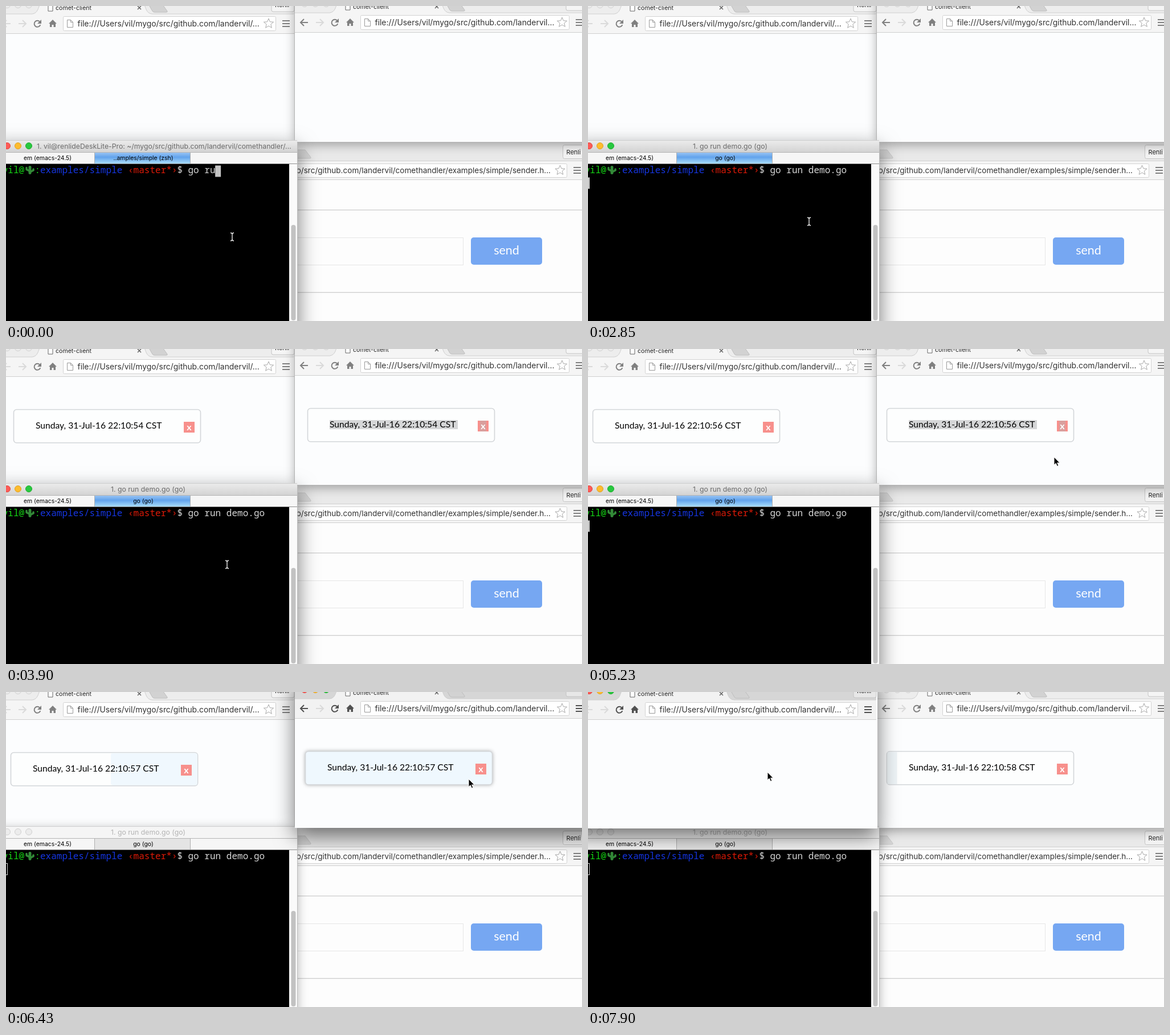
Animation, 1011 px wide and 554 px high, one loop 8 s. Source, as an HTML page:

```html
<!DOCTYPE html>
<html lang="en">
<head>
<meta charset="utf-8">
<title>comet-client</title>
<style>
html, body { margin: 0; width: 100%; height: 100%; overflow: hidden; background: #fdfdfd; }
svg { display: block; }
text { font-family: Inter, "Liberation Sans", sans-serif; white-space: pre; }
.mono { font: 500 16.05px "Noto Sans Mono", "DejaVu Sans Mono", monospace; }
.geo { font-family: Lato, "Open Sans", sans-serif; }
.mid { text-anchor: middle; }
.url { font-size: 13.88px; fill: #333; }
#sender .url { font-size: 13.55px; }
.tab { font-size: 10.6px; fill: #222; }
.frame { fill: #fcfdfe; filter: drop-shadow(0 5px 9px rgba(0,0,0,.32)); }
.on > .frame { filter: drop-shadow(0 14px 18px rgba(0,0,0,.55)); }
.strip { fill: #ededed; }
.on > .strip { fill: #d6d6d6; }
.bar { fill: #f5f5f5; }
.on > .bar { fill: #f2f2f2; }
.edge { stroke: #cfcfcf; fill: none; }
.icon { stroke: #808080; stroke-width: 2; fill: none; }
.on > .icon { stroke: #505050; }
.faint { stroke: #dadada; stroke-width: 2; fill: none; }
.icon .solid { fill: #808080; stroke: none; }
.on > .icon .solid { fill: #505050; }
.light { fill: #ececec; stroke: #d0d0d0; }
.on > .r { fill: #fc5b57; stroke: #e2463f; }
.on > .y { fill: #fdbc2e; stroke: #e0a023; }
.on > .g { fill: #28c840; stroke: #1dad2b; }
#title { font-size: 12.25px; fill: #b4b4b4; }
.on > #title { fill: #6b6b6b; }
#term .off { fill: #f5f5f5; }
#term .picked { fill: #e4e4e4; }
#term.on .off { fill: url(#chrome); }
#term.on .picked { fill: url(#aqua); }
.box { fill: #fdfefe; stroke: #d3d6d9; stroke-width: 1.6; }
.hover .box { fill: #eff8fe; filter: drop-shadow(0 0 3px rgba(0,0,0,.3)); }
.caption { font-size: 15.65px; }
</style>
</head>
<body>
<svg id="stage" width="1011" height="554" viewBox="0 0 1011 554"></svg>
<script>
const LOOP = 8000;
const svg = document.getElementById('stage');
const $ = id => document.getElementById(id);

const rect = (x, y, w, h, attrs = '') => `<rect x="${x}" y="${y}" width="${w}" height="${h}" ${attrs}/>`;
const text = (x, y, str, cls = '', attrs = '') => `<text x="${x}" y="${y}" class="${cls}" ${attrs}>${str}</text>`;
const line = (x1, y1, x2, y2, color) => `<path d="M${x1} ${y1}L${x2} ${y2}" stroke="${color}"/>`;

function star(cx, cy) {
  const pts = Array.from({ length: 10 }, (_, i) => {
    const a = i * Math.PI / 5 - Math.PI / 2, r = i % 2 ? 4 : 9;
    return (cx + r * Math.cos(a)).toFixed(1) + ',' + (cy + r * Math.sin(a)).toFixed(1);
  });
  return `<polygon points="${pts.join(' ')}" fill="#fff" stroke="#a8a8a8"/>`;
}

const menu = (x, y) => `<path class="icon" d="M${x} ${y - 5}h13m-13 5h13m-13 5h13"/>`;

const lights = y => ['r', 'y', 'g'].map((c, i) =>
  `<circle class="light ${c}" cx="${2 + 19 * i}" cy="${y}" r="5.5"/>`).join('');

const pageIcon = (x, y) =>
  `<path d="M${x} ${y}h6l4 4v9h-10z M${x + 6} ${y}v4h4" fill="#fff" stroke="#999"/>`;

const profile = (x, y) => rect(x, y, 40, 24, 'rx="3" fill="#fff" fill-opacity=".4" stroke="#c4c4c4"')
  + text(x + 6, y + 16, 'Renli', 'tab', 'style="font-size:11px"');

// Card at its own origin: frame, time stamp and close button.
const card = (id, extra, marked) => `<g id="${id}">
  ${rect(0.5, 0.5, 328, 58.5, 'rx="5" class="box"')}${extra}
  ${marked ? `<g id="marked">${rect(39, 21, 225, 16, 'fill="#d5d6d7"')}</g>` : ''}
  ${text(39, 34, '', 'geo caption')}
  ${rect(299, 22, 19, 19, 'fill="#f7908c"')}
  ${marked ? `<g id="markedX">${rect(303, 22, 11, 19, 'fill="#d99f9d"')}</g>` : ''}
  ${text(308.5, 36.5, 'x', 'mid geo', 'fill="#fff" font-size="16" font-weight="700"')}
</g>`;

// Browser window; `cut` shortens the address field on its right.
function browser(id, { dx, dy, cut, url, frame, back }) {
  return `<g id="${id}"><g class="slot" transform="translate(${dx} ${dy})">
    ${frame}
    ${rect(-15, -30, 521, 44, 'class="strip"')}
    ${rect(-15, 14, 521, 34, 'class="bar"')}
    <path class="bar" d="M46 14.500q7-1 10-8l6-16h178l6 16q3 7 10 8z"/>
    <path class="edge" d="M-15 14H46q7-1 10-8l6-16M240-10l6 16q3 7 10 8H${505 - cut}M-15 48.500H506"/>
    <path d="M249-5h24l10 14q1 2-2 2h-20q-3 0-4-2z" fill="#d2d2d2" stroke="#bdbdbd"/>
    ${lights(-2)}
    <path d="M74-6h8v15h-8z" fill="#fff" stroke="#666"/>
    ${text(87, 7, 'comet-client', 'tab')}
    <path d="M231 0l6 6m0-6l-6 6" stroke="#666" stroke-width="1.500"/>
    ${profile(466 - cut / 1.4, -14)}
    <path class="${back}" d="M8 31h-13m6-6l-6 6 6 6"/>
    <path class="faint" d="M22 31h13m-6-6l6 6-6 6"/>
    <g class="icon"><path d="M59.500 28a5.500 5.500 0 1 0 .800 5"/><path class="solid" d="M62 24v7h-7z"/>
      <path class="solid" d="M82 24l7 7h-2v6h-3.500v-4h-3v4H77v-6h-2z"/></g>
    ${rect(100.5, 18.5, 373 - cut, 25, 'rx="2" fill="#fff" stroke="#d2d2d2"')}
    ${pageIcon(107.5, 24.5)}
    ${text(125.5, 36, url, 'url')}
    ${star(461 - cut, 31)}
    ${menu(485 - cut, 31)}
  </g></g>`;
}

const sender = `<g id="sender">
  ${rect(505, 240, 520, 330, 'class="frame"')}
  ${rect(505, 240, 520, 33, 'fill="#e9e9e9"')}
  <path d="M505 253h20l10 13q1 2-2 2h-28z" fill="#d6d6d6" stroke="#c8c8c8"/>
  ${profile(977.5, 244.5)}
  ${rect(505, 273, 520, 32, 'fill="#f5f5f5"')}
  ${line(505, 272.5, 1011, 272.5, '#d0d0d0')}${line(505, 305.5, 1011, 305.5, '#cfcfcf')}
  ${rect(490, 277.5, 494.5, 24, 'rx="2" fill="#fff" stroke="#d2d2d2"')}
  ${text(956, 294, 'o/src/github.com/landervil/comethandler/examples/simple/sender.h...', 'url', 'text-anchor="end"')}
  ${star(972.5, 289)}${menu(996, 289)}
  ${rect(505, 306, 520, 248, 'fill="#fdfdfd"')}
  ${[358, 503].map(y => rect(505, y, 506, 1, 'fill="#d0d0d0"') + rect(505, y + 1, 506, 1, 'fill="#ebebeb"')).join('')}
  ${rect(490.5, 407.5, 312, 48, 'fill="#fdfdfd" stroke="#e6e6e6"')}
  ${rect(816, 407, 125, 48, 'rx="5" fill="#76a7f2"')}
  ${text(878.5, 437, 'send', 'geo mid', 'fill="#fff" font-size="21.5"')}
</g>`;

const term = `<g id="term">
  ${rect(-30, 236, 541, 340, 'class="frame"')}
  ${rect(0, 236, 511, 21, 'class="off"')}
  ${line(0, 236.5, 511, 236.5, '#cfcfcf')}
  ${lights(246)}
  <text id="title" y="251"></text>
  ${rect(0, 257, 511, 21, 'fill="#f6f6f6"')}
  ${rect(155, 257, 169, 20, 'class="picked"')}
  ${line(0, 257.5, 511, 257.5, '#b4b4b4')}${line(0, 277.5, 511, 277.5, '#8f8f8f')}
  ${line(155.5, 258, 155.5, 277, '#b0b0b0')}${line(323.5, 258, 323.5, 277, '#b0b0b0')}
  ${text(73, 271, 'em (emacs-24.5)', 'mid', 'font-size="10.4"')}
  <text id="tab" x="241" y="271" class="mid" font-size="10.4"></text>
  ${rect(0, 278, 497, 276)}
  ${rect(497, 278, 14, 276, 'fill="#fafafa"')}
  ${rect(500.5, 385, 8, 168, 'rx="4" fill="#c2c2c2"')}
  ${line(511.5, 240, 511.5, 554, '#bdbdbd')}
  ${text(-6.3, 294, 'vil@', 'mono', 'fill="#14d414"')}
  <g fill="none" stroke="#338a38" stroke-linecap="round" stroke-linejoin="round">
    <path d="M42 283.500v10" stroke-width="5"/>
    <path d="M36 284.500v3l5 2.500M48 287v2l-5 2.500" stroke-width="3.500"/></g>
  ${text(50.5, 294, ':', 'mono', 'fill="#14d414"')}
  ${text(60, 294, 'examples/simple', 'mono', 'fill="#1636e2"')}
  ${text(214, 294, '‹master*›', 'mono', 'fill="#dc1a08"')}
  ${text(300.5, 294, '$', 'mono', 'fill="#d6d6d6"')}
  <text id="typed" x="319.500" y="294" class="mono" fill="#d6d6d6"></text>
  <rect id="caret" width="10" height="20"/>
</g>`;

const path = 'file:///Users/vil/mygo/src/github.com/landervil';
svg.innerHTML = `<defs>
  <linearGradient id="chrome" x2="0" y2="1"><stop stop-color="#ececec"/><stop offset="1" stop-color="#d3d3d3"/></linearGradient>
  <linearGradient id="aqua" x2="0" y2="1"><stop stop-color="#9cc6f4"/><stop offset=".45" stop-color="#62a3ec"/>
    <stop offset="1" stop-color="#a8dcfb"/></linearGradient></defs>`
  + sender
  + browser('left', { dx: 0, dy: 0, cut: 0, url: path + '/...', back: 'faint',
    frame: rect(-30, -30, 536, 266, 'class="frame"') })
  + browser('right', { dx: 522, dy: -2, cut: 7, url: path + '...', back: 'icon',
    frame: rect(-15, -30, 540, 271, 'class="frame"') })
  + term
  + `<g id="mouse">
      <path id="beam" d="M-3-7q3 0 3 2.500v9q0 2.500-3 2.500M3-7q-3 0-3 2.500M3 7q-3 0-3-2.500" fill="none" stroke="#e8e8e8" stroke-width="1.400"/>
      <path id="arrow" d="M0 0v14l3.200-3 2.300 5.200 2.400-1-2.300-5h4.400z" stroke="#fff"/></g>`;

const leftSlot = $('left').firstElementChild, rightSlot = $('right').firstElementChild;
leftSlot.insertAdjacentHTML('beforeend',
  card('cardL', `<g id="tint">${rect(176, 1.5, 152, 56.5, 'rx="4" fill="#f0f8fe"')}</g>`, false));
rightSlot.insertAdjacentHTML('beforeend',
  card('cardR', `<g id="streak">${rect(1.5, 1.5, 17, 56.5, 'fill="#ecf2f5"')}</g>`, true));

// Each track holds [start, value] pairs; a value lasts until the next start.
const at = (track, t) => track.findLast(step => step[0] <= t)[1];

const tracks = {
  focus: [[0, 'term'], [5530, 'right'], [7160, 'left']],
  typed: [[0, 'go ru'], [300, 'go run'], [450, 'go run d'], [600, 'go run de'], [900, 'go run demo.go ']],
  caret: [[0, 1], [1950, 0], [2850, 1], [3000, 0], [3450, 1], [3600, 0], [4630, 1]],
  second: [[0, 54], [4330, 55], [5080, 56], [6280, 57], [7160, 58]],
  shift: [[0, 5], [4780, 2], [4930, 0]],
  showL: [[0, 0], [3450, .5], [3600, 1], [7460, .75], [7610, .45], [7750, .2], [7900, 0]],
  showR: [[0, 0], [3450, .5], [3600, 1]],
  mouse: [[0, [397, 406]], [1800, [391, 388]], [1950, [388, 379]],
    [4780, [430, 352]], [4930, [580, 290]], [5080, [750, 217]], [5230, [818, 190]],
    [5380, [826, 160]], [5530, [830, 137]], [5680, [827, 151]],
    [5980, [823, 152]], [6130, [819, 153]], [6280, [815, 153]], [6430, [812, 153]],
    [6570, [705, 176]], [6720, [530, 200]], [6870, [390, 182]], [7010, [314, 150]],
    [7160, [307, 142]], [7610, [310, 142]], [7750, [313, 142]], [7900, [315, 141]]]
};

const show = (el, on) => el.setAttribute('visibility', on ? 'inherit' : 'hidden');
const set = (el, attrs) => { for (const k in attrs) el.setAttribute(k, attrs[k]); };
const write = (el, str) => { if (el.textContent !== str) el.textContent = str; };

// The active window is drawn last, so its shadow falls on the others.
let active = '';
function focusOn(name) {
  if (name === active) return;
  active = name;
  const slots = { sender: $('sender'), left: leftSlot, right: rightSlot, term: $('term') };
  for (const id in slots) slots[id].classList.toggle('on', id === name);
  const order = Object.keys(slots).filter(id => id !== name);
  [...order, name, 'mouse'].forEach(id => svg.append($(id)));
  const grown = name === 'left';
  set(leftSlot.querySelector('.frame'), { width: grown ? 538 : 536, height: grown ? 270 : 266 });
}

function drawCard(el, x, y, opacity, label) {
  set(el, { transform: `translate(${x} ${y})`, opacity });
  show(el, opacity > 0);
  write(el.querySelector('.caption'), label);
}

function render(t) {
  const now = {};
  for (const k in tracks) now[k] = at(tracks[k], t);
  focusOn(now.focus);

  const running = t >= 1350, solid = now.focus === 'term';
  write($('typed'), now.typed.trimEnd());
  write($('title'), running ? '1. go run demo.go (go)'
    : '1. vil@renlideDeskLite-Pro: ~/mygo/src/github.com/landervil/comethandler/...');
  set($('title'), { x: running ? 184 : 54 });
  write($('tab'), running ? 'go (go)' : '..amples/simple (zsh)');
  set($('caret'), {
    x: running ? (solid ? -7 : -7.5) : 319 + 9.63 * now.typed.length,
    y: running ? 301.5 : 280.5,
    fill: solid ? '#c4c4c4' : 'none',
    stroke: solid ? 'none' : '#d0d0d0'
  });
  show($('caret'), now.caret);

  const [mx, my] = now.mouse;
  const hover = now.focus === 'right' && mx > 524 && mx < 853 && my > 102 && my < 163;
  const label = `Sunday, 31-Jul-16 22:10:${now.second} CST`;
  drawCard($('cardL'), 8 + now.shift, 106, now.showL, label);
  drawCard($('cardR'), 2 + now.shift + (hover ? 1 : 0), 106, now.showR, label);
  $('cardR').classList.toggle('hover', hover);
  show($('tint'), t >= 6280 && now.focus === 'right');
  show($('streak'), now.focus === 'left');
  show($('marked'), solid);
  show($('markedX'), solid);

  set($('mouse'), { transform: `translate(${mx} ${my})` });
  const overText = mx < 497 && my > 278;
  show($('beam'), overText);
  show($('arrow'), !overText);
}

const start = performance.now();
function tick() {
  render((performance.now() - start) % LOOP);
  requestAnimationFrame(tick);
}
tick();
</script>
</body>
</html>
```
